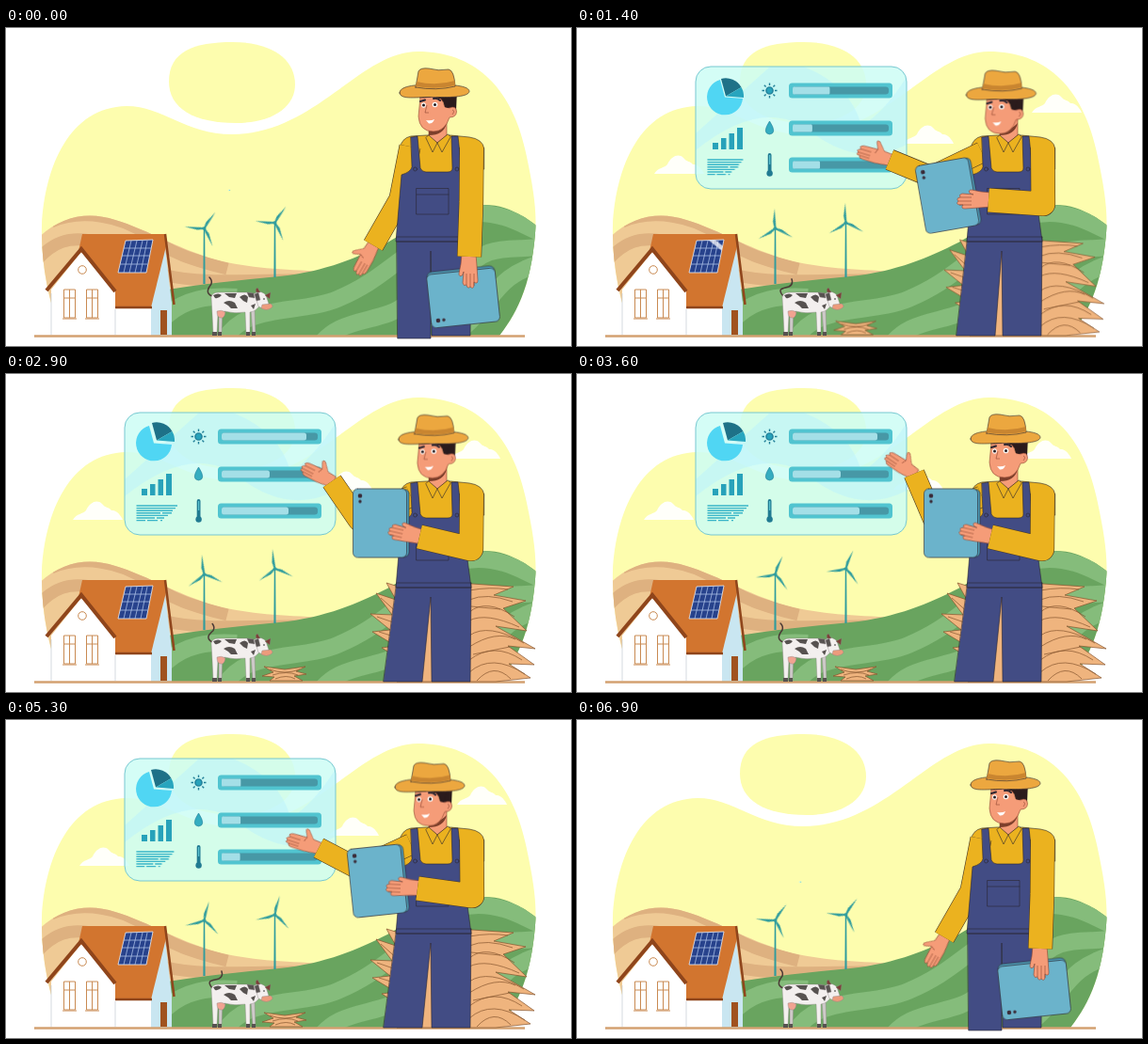
Write an HTML page that moves like this. It is 600 px wide and 338 px high and loops after 7 s.

```html
<!DOCTYPE html>
<html lang="en">
<head>
<meta charset="utf-8">
<title>Smart farm</title>
<style>
html, body { margin: 0; width: 100%; height: 100%; overflow: hidden; background: #fff; }
svg { display: block; width: 100vw; height: 100vh; }
.loop { animation: 7s linear infinite; }
.ink { stroke: #2b2530; stroke-width: .6; stroke-linejoin: round; stroke-linecap: round; }
.skin { fill: #f59c78; stroke: #8d4632; stroke-width: .6; stroke-linejoin: round; }
.line { fill: none; }

/* Scenery */
.spin { animation-name: spin; }
@keyframes spin {
  0% { transform: rotate(-55deg); }
  20% { transform: rotate(28deg); }
  31.43% { transform: rotate(115deg); }
  51.43% { transform: rotate(172deg); }
  75.71% { transform: rotate(285deg); }
  88.57% { transform: rotate(338deg); }
  98.57%, 100% { transform: rotate(425deg); }
}
.cloud { animation-name: drift; }
@keyframes drift {
  0%, 100% { transform: translateX(50px); opacity: 0; }
  10% { transform: translateX(36px); opacity: .4; }
  20% { transform: translateX(11px); opacity: 1; }
  30%, 70% { transform: none; opacity: 1; }
  75.71% { transform: translateX(7px); opacity: 1; }
  88.57% { transform: translateX(36px); opacity: .4; }
  97% { transform: translateX(48px); opacity: 0; }
}
.shine { animation-name: shine; }
@keyframes shine {
  0%, 18% { transform: translate(8px, -16px); }
  27%, 82% { transform: translate(-46px, 40px); }
  88.57% { transform: translate(-17px, 15px); }
  93%, 100% { transform: translate(8px, -16px); }
}
.tail { animation: tail 1.75s ease-in-out infinite alternate; }
@keyframes tail {
  from { d: path("M219 285C211 282 215 276 218 272C219 269 218 267 216 265"); }
  to { d: path("M219 285C212 276 219 277 226 275C230 273 230 270 229 267"); }
}
.hay { animation-name: hay; }
@keyframes hay {
  0%, 5%, 92%, 100% { transform: scale(0); }
  10%, 88.57% { transform: scale(var(--s)); animation-timing-function: ease-out; }
  20% { transform: scale(.97); }
  26%, 78% { transform: none; animation-timing-function: ease-in; }
}

/* Dashboard */
.panel { transform-origin: 237px 173px; animation-name: panel; }
@keyframes panel {
  0%, 100% { transform: scale(.006); animation-timing-function: ease-out; }
  8.5%, 89% { transform: none; animation-timing-function: ease-in; }
  98.57% { transform: scale(.011); }
}
.pop { animation-name: pop; }
@keyframes pop {
  0%, 9%, 90%, 100% { transform: scale(0); }
  10%, 88.57% { transform: scale(.25); }
  17%, 80% { transform: none; }
}
.col { animation-name: col; }
@keyframes col {
  0%, 9%, 90%, 100% { transform: scaleY(0); }
  10%, 88.57% { transform: scaleY(var(--s)); }
  18%, 80% { transform: none; }
}
.slice { animation-name: slice; }
@keyframes slice {
  0%, 13%, 86%, 100% { transform: none; }
  20% { transform: translate(1px, -1px); }
  30%, 72% { transform: translate(3px, -3px); }
  75.71% { transform: translate(2px, -2px); }
}
.fill { animation-name: fill; }
@keyframes fill {
  0%, 12%, 79%, 100% { transform: scaleX(0); }
  20% { transform: scaleX(var(--a)); }
  30%, 70% { transform: none; }
  75.71% { transform: scaleX(var(--b)); }
}
.notes { animation-name: notes; }
@keyframes notes {
  0%, 12%, 86%, 100% { transform: scaleX(0); }
  20% { transform: scaleX(.87); }
  26%, 72% { transform: none; }
  75.71% { transform: scaleX(.92); }
}

/* Farmer */
.head { animation: nod 1.75s ease-in-out infinite alternate; }
@keyframes nod { to { transform: translate(-5px, 2.5px); } }
.legs { animation-name: legs; }
@keyframes legs {
  0%, 98.57%, 100% { d: path("M415 222L494 222L493 327L452 327L451 237L451 330L416 330Z"); }
  10%, 88.57% { d: path("M415 222L494 222L493 327L452 327L451 237L450 330L411 330Z"); }
  20% { d: path("M415 222L494 222L493 327L452 327L451 237L444 327L403 327Z"); }
  31.43%, 75.71% { d: path("M415 222L494 222L493 327L452 327L451 237L442 327L401 327Z"); }
}
.arm { animation-name: arm; }
@keyframes arm {
  0%, 98.57%, 100% { d: path("M429 126L418 182L390 231"); animation-timing-function: ease-in; }
  10% { d: path("M430 130L398 185L354 208"); animation-timing-function: ease-out; }
  20% { d: path("M430 132L376 158L332 140"); }
  31.43% { d: path("M430 130L371 158L334 122"); animation-timing-function: ease-in-out; }
  51.43% { d: path("M430 130L378 153L358 106"); animation-timing-function: ease-in-out; }
  75.71% { d: path("M430 132L374 158L332 136"); animation-timing-function: ease-in; }
  88.57% { d: path("M430 130L398 185L354 208"); animation-timing-function: ease-out; }
}
.palm { animation-name: palm; }
@keyframes palm {
  0%, 98.57%, 100% { transform: translate(390px, 231px) rotate(-60deg); animation-timing-function: ease-in; }
  10% { transform: translate(354px, 208px) rotate(-36deg); animation-timing-function: ease-out; }
  20% { transform: translate(332px, 140px) rotate(17deg); }
  31.43% { transform: translate(334px, 122px) rotate(20deg); animation-timing-function: ease-in-out; }
  51.43% { transform: translate(358px, 106px) rotate(34deg); animation-timing-function: ease-in-out; }
  75.71% { transform: translate(332px, 136px) rotate(18deg); animation-timing-function: ease-in; }
  88.57% { transform: translate(354px, 208px) rotate(-36deg); animation-timing-function: ease-out; }
}
.arm2 { animation-name: arm2; }
@keyframes arm2 {
  0%, 98.57%, 100% { d: path("M494.5 127L494 185L492 243"); animation-timing-function: ease-in; }
  10% { d: path("M494.5 127L490 190L462 230"); animation-timing-function: ease-out; }
  20% { d: path("M494.5 127L495 187L437 183"); }
  31.43%, 51.43% { d: path("M494.5 127L494 186L439 173"); animation-timing-function: ease-in-out; }
  75.71% { d: path("M494.5 127L495 187L437 179"); animation-timing-function: ease-in; }
  88.57% { d: path("M494.5 127L490 190L462 230"); animation-timing-function: ease-out; }
}
.grip { animation-name: grip; }
@keyframes grip {
  0%, 98.57%, 100% { transform: translate(492px, 243px) rotate(-90deg); animation-timing-function: ease-in; }
  10% { transform: translate(462px, 230px) rotate(-55deg); animation-timing-function: ease-out; }
  20% { transform: translate(437px, 183px); }
  31.43%, 51.43% { transform: translate(439px, 173px) rotate(13deg); animation-timing-function: ease-in-out; }
  75.71% { transform: translate(437px, 179px) rotate(3deg); animation-timing-function: ease-in; }
  88.57% { transform: translate(462px, 230px) rotate(-55deg); animation-timing-function: ease-out; }
}
.tablet { animation-name: tablet; }
@keyframes tablet {
  0%, 98.57%, 100% { transform: translate(485.5px, 286px) rotate(-96deg); animation-timing-function: ease-in; }
  10% { transform: translate(434px, 268px) rotate(-65deg); animation-timing-function: ease-out; }
  20% { transform: translate(394px, 178px) rotate(-10deg); }
  31.43%, 51.43% { transform: translate(398px, 158.5px); animation-timing-function: ease-in-out; }
  75.71% { transform: translate(395px, 171px) rotate(-6deg); animation-timing-function: ease-in; }
  88.57% { transform: translate(434px, 268px) rotate(-65deg); animation-timing-function: ease-out; }
}
</style>
</head>
<body>
<svg viewBox="0 0 600 338" preserveAspectRatio="none">
  <defs>
    <path id="blob" d="M60 327C45 292 37 250 38 210C41 148 67 84 128 83C167 83 190 113 240 113C328 113 376 25 437 25C505 25 540 72 553 137C560 170 564 195 562 218C558 265 548 296 524 327Z"/>
    <path id="hill" d="M160 280C205 272 250 268 290 264C340 259 375 243 405 228C440 208 470 191 505 188C530 187 548 198 570 215V327H160Z"/>
    <path id="dune" d="M30 228C52 202 84 193 116 204C150 214 188 238 230 248C265 256 300 257 345 259V327H30Z"/>
    <path id="cell" d="M127 226L156 225L149 260L119 260Z"/>
    <path id="puff" d="M0 24C4 17 11 18 14 14C18 5 26 2 31 7C35 12 38 10 41 14C46 13 51 19 53 24Z"/>
    <path id="rotor" d="M0-.8L7-2.200L21 0L0 1Z"/>
    <g id="blades"><use href="#rotor"/><use href="#rotor" transform="rotate(120)"/><use href="#rotor" transform="rotate(240)"/></g>
    <g id="gauge"><rect width="110" height="16" rx="3.500" fill="#51c4d0"/><rect x="4" y="4" width="102" height="8" rx="3" fill="#4798a6"/></g>
    <path id="window" fill="#fff" stroke="#c98a52" d="M1.500 0H13.500V30H1.500ZM7.500 0V30M1.500 9H13.500M0 31H15"/>
    <clipPath id="inBlob"><use href="#blob"/></clipPath>
    <clipPath id="inHill"><use href="#hill"/></clipPath>
    <clipPath id="inDune"><use href="#dune"/></clipPath>
    <clipPath id="inCell"><use href="#cell"/></clipPath>
    <clipPath id="inPanel"><rect x="126" y="41" width="224" height="130" rx="16"/></clipPath>
  </defs>

  <use href="#blob" fill="#fdfdae"/>
  <path fill="#fdfdae" d="M173 57C173 25 199 15 241 15C284 15 307 34 307 60C307 84 283 101 244 101C199 101 173 85 173 57Z"/>

  <g fill="#fffffa">
    <g class="loop cloud"><use href="#puff" x="71" y="131"/></g>
    <g class="loop cloud"><use href="#puff" x="472" y="66"/></g>
    <g class="loop cloud"><use href="#puff" x="336" y="99"/></g>
  </g>

  <g clip-path="url(#inBlob)">
    <use href="#dune" fill="#efca95"/>
    <g clip-path="url(#inDune)" class="line" stroke="#deb180" stroke-width="13">
      <path d="M48 206C80 192 125 200 150 220S200 247 235 256M30 250C50 226 68 222 90 226M165 262C215 274 270 266 345 268"/>
    </g>
    <use href="#hill" fill="#69a45f"/>
    <g clip-path="url(#inHill)" class="line" stroke="#85bc7b" stroke-width="18">
      <path d="M170 306C190 288 215 284 245 286M228 338C250 290 310 306 352 288S405 254 440 232M330 342C352 304 400 316 426 292M480 200C515 190 545 206 575 222M484 262C510 226 535 238 575 232M486 318C520 290 518 262 575 248"/>
    </g>
  </g>

  <g fill="#2f9c9d">
    <path d="M209.800 213H211.200L211.600 272H209.400ZM284.800 207H286.200L286.600 265H284.400Z"/>
    <g transform="translate(210.500 213)"><g class="loop spin"><use href="#blades"/></g><circle r="1.700"/></g>
    <g transform="translate(285.500 207)"><g class="loop spin"><use href="#blades"/></g><circle r="1.700"/></g>
  </g>

  <!-- House -->
  <path fill="#fff" d="M48 278L80 238L154 290V327H48Z"/>
  <path fill="#c9e6f1" d="M168 226L176 292V327H154V294Z"/>
  <path fill="#a0521f" d="M164 300H171V326H164Z"/>
  <path fill="#d2752f" d="M81 219H169L170 232L154 297H110L77 237Z"/>
  <path class="line" stroke="#8f451b" stroke-width="2.500" d="M169 219L178.500 294M109 297H155"/>
  <path fill="#fff" d="M48 279L80 238L116 280V327H48Z"/>
  <path class="line" stroke="#8f451b" stroke-width="4" d="M43 279L80 235L116 280"/>
  <path class="line" stroke="#c3cad2" stroke-width=".7" d="M48 282V326M116 299V326"/>
  <circle cx="81" cy="257" r="4.300" fill="#fff" stroke="#c98a52"/>
  <use href="#window" x="60" y="278"/><use href="#window" x="84" y="278"/>
  <use href="#cell" fill="#27428c" stroke="#e8eef8" stroke-width=".8"/>
  <path class="line" stroke="#b9cdf0" stroke-width=".7" d="M133 226L125 260M139 226L131 260M145 226L137 260M150 226L143 260M125 234H154M123 242H152M121 251H150"/>
  <g clip-path="url(#inCell)"><path class="loop shine" fill="#fff" opacity=".75" d="M138 218L166 241L164 245L135 222Z"/></g>

  <path class="line" stroke="#d3a170" stroke-width="2.500" d="M30 327.500H551"/>

  <!-- Cow -->
  <g stroke="#8a8080" stroke-width=".4" stroke-linejoin="round">
    <path class="tail line" stroke="#4b3a36" stroke-width="1.500" stroke-linecap="round" d="M219 285C211 282 215 276 218 272C219 269 218 267 216 265"/>
    <path fill="#cfcaca" d="M226 298H230L229 326H226ZM260 298H264L265 326H262Z"/>
    <path fill="#f3efee" d="M218 286Q219 281 226 281H256L268 283L270 294Q266 301 259 302V326H255L254 302Q242 304 232 301L225 305L224 326H220L219 304Z"/>
    <path fill="#f1a391" d="M224 301Q229 299 233 302Q232 309 228 308Q224 308 224 301Z"/>
    <g fill="#575250" stroke="none">
      <path d="M220 284Q226 281 229 284Q226 288 222 287ZM232 282H245L243 287L237 286ZM231 292Q237 288 243 292L246 298L239 298L236 295ZM248 286Q254 281 257 286L256 292L252 290ZM260 295L265 293L263 299Z"/>
      <path d="M219 323H224V327H219ZM225 323H229V327H225ZM255 323H259V327H255ZM261 323H265V327H261Z"/>
    </g>
    <path fill="#f3efee" d="M264 282Q271 278 276 284L279 293L275 299L268 296Z"/>
    <path fill="#575250" d="M264 283L268 281L270 289L266 290ZM263 282L256 281L258 286L264 287Z"/>
    <path fill="#7b3f36" d="M275 284L281 281L280 288ZM266 281Q264 278 267 276L270 281Z"/>
    <path fill="#ed9b7c" d="M272 294L281 293Q285 296 281 298Q277 301 271 298Z"/>
    <circle cx="274" cy="288" r=".8" fill="#222" stroke="none"/>
  </g>

  <!-- Straw -->
  <g fill="#efb47e" stroke="#86552f" stroke-width=".7" stroke-linejoin="round">
    <g class="loop hay" style="--s:.55; transform-origin: 296px 327px">
      <path d="M274 311L296 314L318 311L308 316L319 319L306 321L315 326H280L285 322L272 321L284 317Z"/>
      <path class="line" d="M280 314Q296 320 312 314M283 320Q298 315 310 320M286 324Q298 319 307 324"/>
    </g>
    <g class="loop hay" style="--s:.32; transform-origin: 486px 327px">
      <path d="M415 327L432 312L399 291L414 289L389 274L408 272L387 255L410 256L393 233L414 240L404 222L430 230L480 222L539 226L518 235L552 241L528 249L553 273L520 268L562 292L533 289L561 309L534 308L557 323L520 327Z"/>
      <path class="line" d="M492 230Q514 226 533 229M492 240Q510 232 538 242M492 253Q510 238 540 258M492 262Q510 253 545 269M492 278Q512 264 550 286M492 290Q520 272 541 282M492 304Q518 284 548 304M492 317Q516 296 551 319M500 326Q518 306 536 324M494 247L525 250M496 298L535 290M398 238L417 255M394 258L417 266M396 274L415 280"/>
    </g>
  </g>

  <!-- Dashboard -->
  <g class="loop panel">
    <g clip-path="url(#inPanel)">
      <path fill="#cdfdf5" opacity=".85" d="M126 41H350V171H126Z"/>
      <path fill="#b9f2fc" opacity=".45" d="M126 112L205 41H241Q292 62 302 104Q326 90 350 52V124Q300 150 248 110Q198 72 126 130Z"/>
    </g>
    <rect x="126" y="41" width="224" height="130" rx="16" class="line" stroke="#76c7d0"/>
    <path fill="#50d6f3" d="M157 73.500L176 75A19 19 0 1 1 152 55Z"/>
    <g class="loop slice">
      <path fill="#1e7188" d="M157 73.500L152 55A19 19 0 0 1 173.500 64Z"/>
      <path fill="#28a5be" d="M157 73.500L173.500 64A19 19 0 0 1 176 75Z"/>
    </g>
    <g fill="#28a2ba">
      <path class="loop col" style="--s:.4; transform-origin: 147px 129px" d="M144 122H150V129H144Z"/>
      <path class="loop col" style="--s:0; transform-origin: 155px 129px" d="M153 117H158.500V129H153Z"/>
      <path class="loop col" style="--s:0; transform-origin: 164px 129px" d="M161.500 112H167V129H161.500Z"/>
      <path class="loop col" style="--s:0; transform-origin: 173px 129px" d="M170 106H176V129H170Z"/>
    </g>
    <path class="loop notes line" style="transform-origin: 138px 148px" stroke="#39b5c8" stroke-width="1.400" d="M138.500 140H182M138.500 142.600H180M138.500 145.200H177M138.500 147.800H164M166 147.800H176M138.500 150.400H172M138.500 153H158M160 153H168M138.500 155.600H148M150 155.600H161M164 155.600H166"/>
    <g class="loop pop" style="transform-origin: 204.500px 66.500px" stroke="#227f98" stroke-width="1.400">
      <circle cx="204.500" cy="66.500" r="3.600" fill="#28a2ba"/>
      <path d="M204.500 58.500V61M204.500 72V74.500M196.500 66.500H199M210 66.500H212.500M198.800 60.800L200.600 62.600M208.400 70.400L210.200 72.200M198.800 72.200L200.600 70.400M208.400 62.600L210.200 60.800"/>
    </g>
    <path class="loop pop" style="transform-origin: 204.500px 105px" fill="#35adc0" stroke="#227f98" stroke-width=".6" d="M204.500 99Q213 112 204.500 113Q196 112 204.500 99Z"/>
    <g class="loop pop" style="transform-origin: 204.500px 157px" fill="#217b92">
      <rect x="202.700" y="133" width="3.800" height="22" rx="1.900"/><circle cx="204.600" cy="154.500" r="3.200"/>
      <path fill="#6fd6e2" d="M204.200 135H205.200V145H204.200Z"/>
    </g>
    <use href="#gauge" x="225" y="58.500"/><use href="#gauge" x="225" y="98.500"/><use href="#gauge" x="225" y="137.500"/>
    <g fill="#a4dfe7">
      <rect class="loop fill" style="--a:.44; --b:.23; transform-origin: 229px 0" x="229" y="62.500" width="90" height="8" rx="2.500"/>
      <rect class="loop fill" style="--a:.41; --b:.4; transform-origin: 229px 0" x="229" y="102.500" width="51" height="8" rx="2.500"/>
      <rect class="loop fill" style="--a:.41; --b:.28; transform-origin: 229px 0" x="229" y="141.500" width="71" height="8" rx="2.500"/>
    </g>
  </g>

  <!-- Farmer -->
  <path class="ink" fill="#ebb21f" d="M418 128Q420 117 430 115L446 114H472L492 116Q506 118 507.700 128V150L485 165V210H421Z"/>
  <g class="loop palm">
    <path class="skin" d="M2-6L-8-7L-15-15Q-19-17-18-13L-15-7L-31-6Q-36-4-32-2Q-38 0-34 2Q-37 5-32 5Q-32 8-28 8L-14 8L2 6Z"/>
    <path class="skin line" d="M-32-2H-21M-34 2H-21M-32 5H-21M-15-7L-17-2"/>
  </g>
  <path class="loop arm line" stroke="#4a3a24" stroke-width="23" stroke-linejoin="round" d="M429 126L418 182L390 231"/>
  <path class="loop arm line" stroke="#ebb21f" stroke-width="21.800" stroke-linejoin="round" d="M429 126L418 182L390 231"/>
  <path class="loop legs ink" fill="#424c84" d="M415 222L494 222L493 327L452 327L451 237L451 330L416 330Z"/>
  <path class="ink" fill="#424c84" d="M430 116L437 115L440 149Q442 153 446 153H469Q474 153 474 149L473 115L480 115L484 152L494 227H414L420 156Q430 153 431 148Z"/>
  <path class="ink line" d="M415 222H494M415 227H494M436 170.500H470V198H436ZM436 177H470"/>
  <circle cx="434.500" cy="150" r="2" class="ink line"/><circle cx="479" cy="150" r="2" class="ink line"/>
  <path class="skin" d="M449 99L468 96V114L458 122L449 115Z"/>
  <path fill="#7c3f2b" d="M449 107Q460 110 468 101Q465 114 449 114Z"/>
  <path class="ink" fill="#ebb21f" d="M449 114L458 122L453 132L446 117ZM469 113L458 122L463 132L472 116Z"/>

  <g class="head">
    <path fill="#2b1b1c" d="M439 65H479L478 88L470 93L464 78L440 76Z"/>
    <path class="skin" d="M440 73Q449 75 456 71Q463 73 466 84L471 85Q478 82 478.500 89Q478 95 471 95Q466 110 454 110Q439 110 438 94Z"/>
    <path fill="#2b1b1c" d="M439 66H473L470 85L466 84L464 75Q458 76 456 72Q449 75 439 74Z"/>
    <path class="ink line" stroke="#2b1b1c" style="stroke-width: 2" d="M440 78L445 76.500M454 75Q458 74 461 77"/>
    <ellipse cx="443.500" cy="82" rx="2.300" ry="2.800" fill="#fff"/><ellipse cx="455.500" cy="81.500" rx="2.800" ry="2.800" fill="#fff"/>
    <circle cx="443.500" cy="82" r="1.500" fill="#241a1d"/><circle cx="455.500" cy="81.500" r="1.500" fill="#241a1d"/>
    <path class="skin line" d="M447 82L445 90H449M474 87Q477 88 474 92"/>
    <path fill="#fff" d="M446 98Q451 99 455 97Q453 102 449 101.500Z"/>
    <path class="ink" fill="#eca73f" d="M418 69C418 62 432 60 455 60S492 62 492 67.500C491 73 474 74 455 73.500S419 77 418 69Z"/>
    <path class="ink" fill="#eca73f" d="M435 63L438 46Q440 42 449 43Q459 46 470 44Q476 45 477 62Q457 67 435 63Z"/>
    <path fill="#c98530" d="M436 57Q457 62 476.500 56L477 61Q457 66 435 62Z"/>
  </g>

  <g class="loop tablet">
    <rect class="ink" x="-27" y="-36" width="57" height="72" rx="5" fill="#4c98b3"/>
    <rect class="ink" x="-29.500" y="-36.500" width="57" height="73" rx="5" fill="#6bb3cb"/>
    <circle cx="-22" cy="-29" r="2.300" fill="#3a2b38"/><circle cx="-22" cy="-23" r="1.700" fill="#3a2b38"/>
  </g>
  <g class="loop grip">
    <path class="skin" d="M3-8L-8-9L-18-11Q-22-11-20-7.500L-16-6L-28-7Q-32-6-30-3Q-35-2-32 1Q-35 4-31 5L-27 5Q-30 9-25 9L-10 8L3 7Z"/>
    <path class="skin line" d="M-30-3H-18M-32 1H-18M-31 5H-18"/>
  </g>
  <path class="loop arm2 line" stroke="#4a3a24" stroke-width="26.200" stroke-linejoin="round" d="M494.500 127L494 185L492 243"/>
  <path class="loop arm2 line" stroke="#ebb21f" stroke-width="25" stroke-linejoin="round" d="M494.500 127L494 185L492 243"/>
</svg>
</body>
</html>
```
